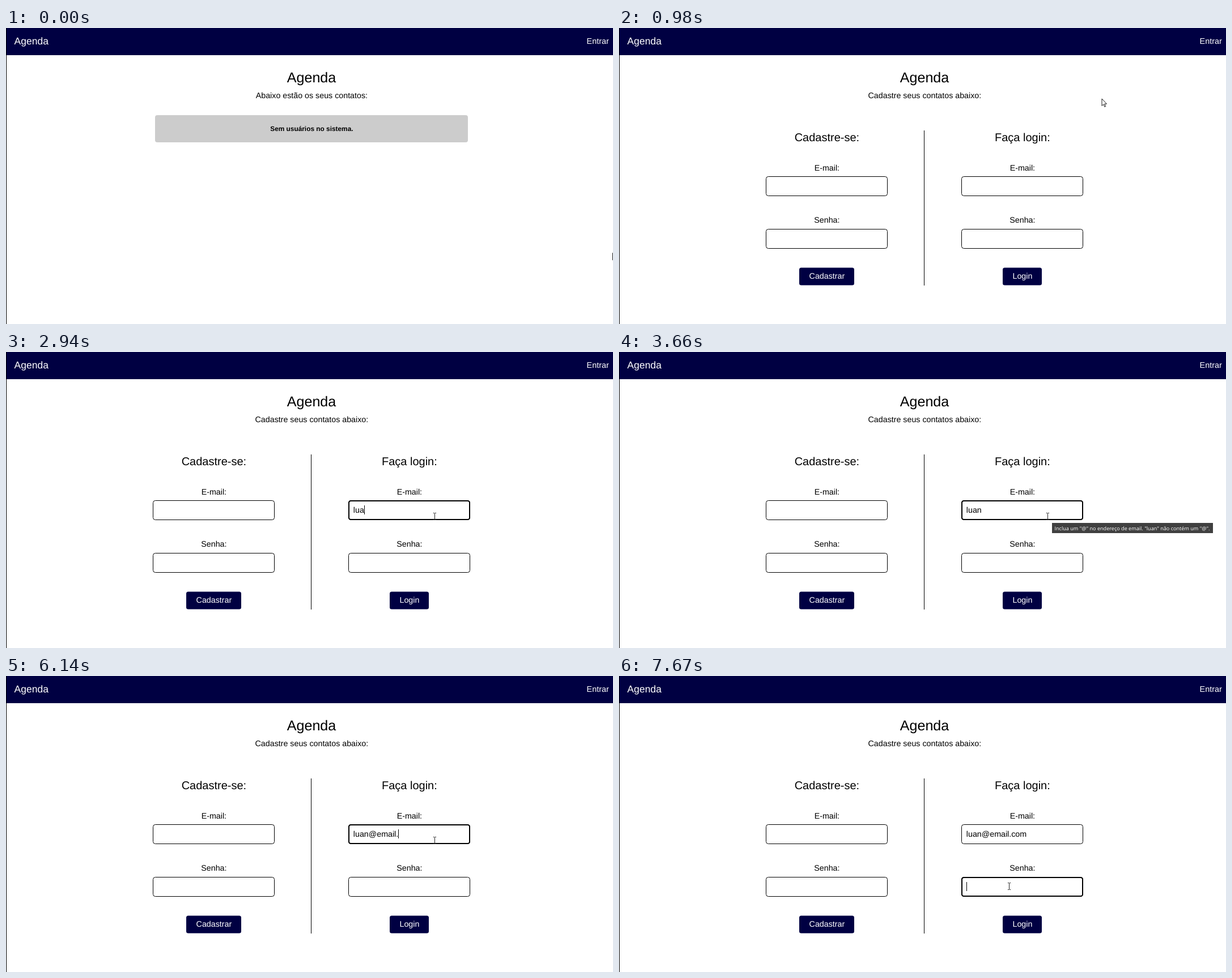
These frames come from a looping animation (1071 by 523 pixels, 8 s). An HTML page:

```html
<!DOCTYPE html>
<html lang="pt-BR">
<head>
<meta charset="utf-8">
<title>Agenda</title>
<style>
  html, body { margin: 0; width: 100%; height: 100%; overflow: hidden; background: #fff; }
  svg { display: block; }
  text { font: 14.25px "Liberation Sans", Arial, sans-serif; text-rendering: geometricPrecision; }
  .mid { text-anchor: middle; }
  .light { fill: #fff; }
  .brand { font-size: 17.5px; }
  .title { font-size: 25.1px; }
  .sub { font-size: 20px; }
  .bold { font-size: 11.87px; font-weight: bold; }
  .hint { font: 9.1px "Open Sans", "Noto Sans", sans-serif; fill: #fff; }
  .navy { fill: #000042; }
  .field { fill: #fff; stroke: #000; }
</style>
</head>
<body>
<svg id="stage" width="1071" height="523" viewBox="0 0 1071 523">
  <rect width="1071" height="523" fill="#fff"/>
  <rect class="navy" width="1071" height="48"/>
  <rect width="1" height="523"/>
  <text class="light brand" x="14.6" y="29">Agenda</text>
  <text class="light mid" x="1044.2" y="27.6" style="font-size:14.4px">Entrar</text>
  <text class="mid title" x="539" y="96">Agenda</text>

  <g id="home">
    <text class="mid" x="539.4" y="123.6">Abaixo estão os seus contatos:</text>
    <rect x="263" y="154" width="552" height="48" rx="4" fill="#ccc"/>
    <text class="mid bold" x="539.4" y="182.2">Sem usuários no sistema.</text>
    <g id="status">
      <path d="M1 509H119Q121 509 121 511V523H1Z" fill="#404040"/>
      <text class="hint" x="4.5" y="520.5">localhost:5000/login/index</text>
    </g>
  </g>

  <g id="login">
    <text class="mid" x="539.4" y="123.6">Cadastre seus contatos abaixo:</text>
    <rect x="538" y="181" width="1" height="274"/>
    <g id="forms"></g>
    <rect id="focus" x="605" width="213" height="33" rx="3.5" fill="none" stroke="#000" stroke-width="2"/>
    <text id="email" x="612.8" y="283.8"></text>
    <rect id="caret" width="1" height="16"/>
    <g id="tip">
      <rect x="764" y="302" width="284" height="18" fill="#404040"/>
      <text class="hint" x="768.5" y="314.6">Inclua um "@" no endereço de email. "luan" não contém um "@".</text>
    </g>
  </g>

  <circle id="click" r="10" fill="#ff0" fill-opacity=".5"/>
  <g id="pointer">
    <path id="arrow" d="M.5 .5V13L3.3 10.3L5.3 14.8L7.2 14L5.2 9.6H9Z" fill="#fff" stroke="#000" stroke-width=".9"/>
    <path id="hand" d="M-1 1Q.5 -1 2 1V6.5Q6 6 9 8.5V13L7 18H1L-3.5 11Q-3.5 9 -1 10.5Z" fill="#fff" stroke="#000" stroke-width=".7"/>
    <path id="beam" d="M-2.5 -5.5H-.5M.5 -5.5H2.5M0 -5V6M-2.5 6.5H-.5M.5 6.5H2.5" fill="none" stroke="#222"/>
  </g>
</svg>
<script>
const LOOP = 8000, BLINK = 530;
const PAGE = 850, FOCUS_EMAIL = 1740, FOCUS_PASS = 7600;
const ADDRESS = 'luan@email.com';
const $ = id => document.getElementById(id);

// time of each key press
const KEYS = [2600, 2730, 2940, 3130, 4330, 5080, 5180, 5270, 5420, 5610, 6140, 6270, 6400, 6530];
// start, end, x, y
const CLICKS = [[650, 720, 1040, 24], [1740, 1810, 754.5, 289.5], [7600, 7670, 687.5, 370.5]];
// time, x, y, shape
const MOVES = [
  [0, 1070, 397, 'arrow'], [70, 1063, 350, 'arrow'], [130, 1046, 270, 'arrow'],
  [200, 1030, 190, 'arrow'], [270, 1020, 120, 'arrow'], [330, 1018, 70, 'arrow'],
  [400, 1027, 32, 'hand'], [450, 1036, 18, 'hand'], [510, 1040, 24, 'hand'],
  [850, 1010, 50, 'arrow'], [910, 940, 84, 'arrow'], [980, 851.5, 124.5, 'arrow'],
  [1050, 805, 165, 'arrow'], [1120, 780, 200, 'arrow'], [1190, 768, 233, 'arrow'],
  [1260, 761, 258, 'arrow'], [1330, 757, 276, 'beam'], [1390, 756.5, 285, 'beam'],
  [1460, 756.5, 290, 'beam'], [7140, 753, 304, 'arrow'], [7200, 738, 350, 'arrow'],
  [7270, 716, 405, 'arrow'], [7330, 702, 429, 'hand'], [7400, 695, 412, 'arrow'],
  [7470, 690, 386, 'beam'], [7540, 688.5, 371, 'beam']
];

function form(cx, heading, label, half) {
  const text = (y, s, cls = '') => `<text class="mid ${cls}" x="${cx + .4}" y="${y}">${s}</text>`;
  const field = y => `<rect class="field" x="${cx - 107}" y="${y}" width="214" height="34" rx="4"/>`;
  return text(199.6, heading, 'sub') + text(251.7, 'E-mail:') + field(262.5) +
    text(344, 'Senha:') + field(355.5) +
    `<rect class="navy" x="${cx - half}" y="423.5" width="${half * 2}" height="31" rx="3.5"/>` +
    text(443.4, label, 'light');
}
$('forms').innerHTML = form(366.5, 'Cadastre-se:', 'Cadastrar', 48.5) +
                       form(711.5, 'Faça login:', 'Login', 34.5);

const show = (id, on) => $(id).setAttribute('visibility', on ? 'inherit' : 'hidden');
const place = (id, x, y) => $(id).setAttribute('transform', `translate(${x} ${y})`);

function draw(t) {
  show('home', t < PAGE);
  show('login', t >= PAGE);
  show('status', t >= 650 && t < PAGE);
  $('status').setAttribute('opacity', t < 720 ? .5 : 1);
  show('tip', t >= 3660 && t < 3990);

  const typed = KEYS.filter(k => k <= t).length;
  const onPass = t >= FOCUS_PASS, focused = t >= FOCUS_EMAIL;
  const email = $('email');
  email.textContent = ADDRESS.slice(0, typed);
  show('focus', focused);
  $('focus').setAttribute('y', onPass ? 356 : 263);

  const since = onPass ? FOCUS_PASS : typed ? KEYS[typed - 1] : FOCUS_EMAIL;
  const width = typed && !onPass ? email.getComputedTextLength() : 0;
  show('caret', focused && (t - since) % (2 * BLINK) < BLINK);
  place('caret', Math.floor(613 + width), onPass ? 364 : 271);

  const click = CLICKS.find(([a, b]) => t >= a && t < b);
  show('click', !!click);
  if (click) place('click', click[2], click[3]);

  const [, x, y, shape] = MOVES.filter(m => m[0] <= t).pop();
  place('pointer', x, y);
  for (const id of ['arrow', 'hand', 'beam']) show(id, id === shape);
}

const start = performance.now();
function tick() {
  draw((performance.now() - start) % LOOP);
  requestAnimationFrame(tick);
}
tick();
</script>
</body>
</html>
```
